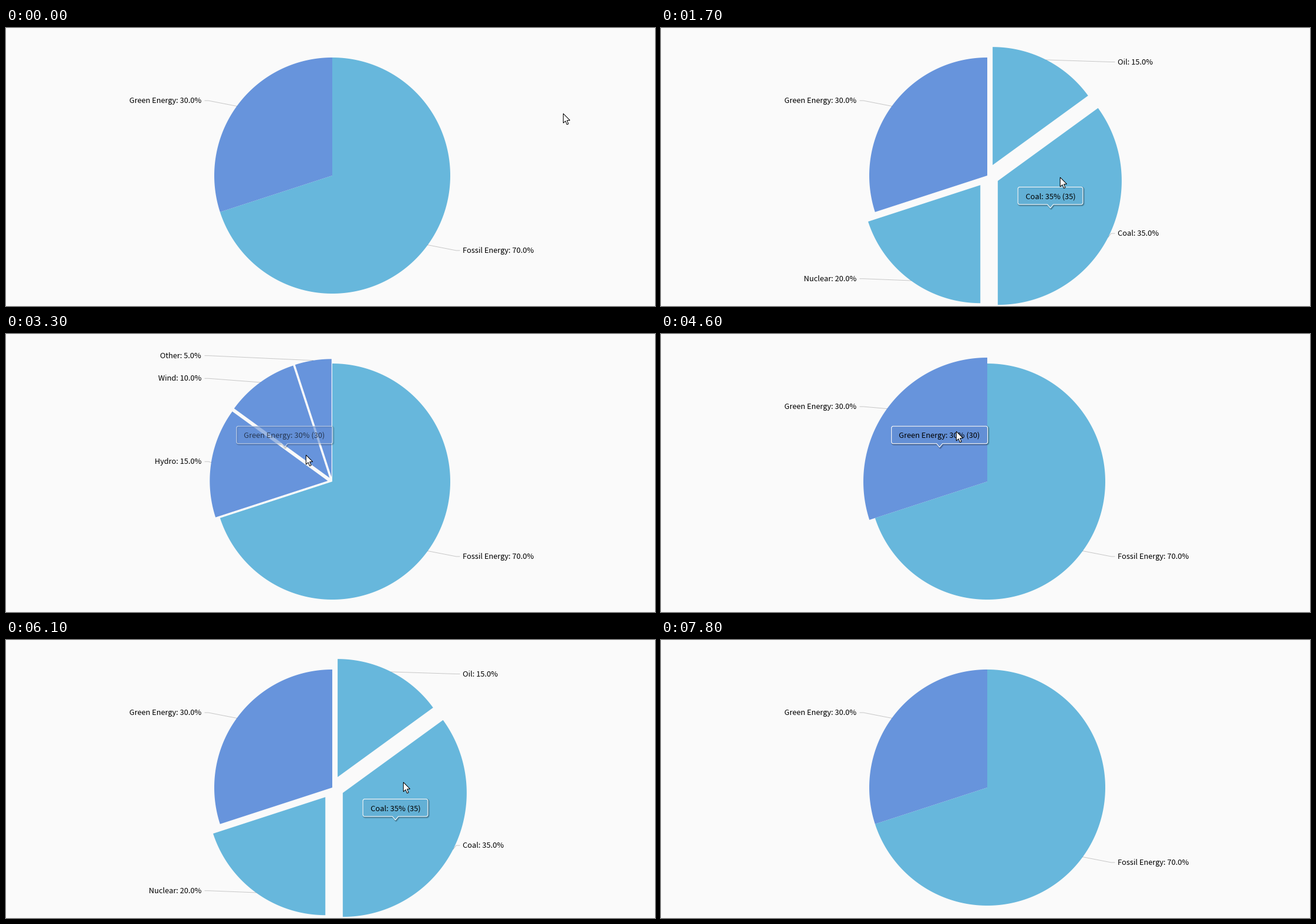
Write a matplotlib script that moves like this. It is 1100 by 471 pixels and loops after 8200 ms.

```python
import numpy as np
import matplotlib.pyplot as plt
from matplotlib.animation import FuncAnimation
from matplotlib.patches import Polygon

W, H, DPI = 1100, 471, 72          # at 72 dpi one point is one pixel
STEP, FRAMES = 100, 82
CENTER = np.array([553.0, 250.0])
RADIUS, GROW, PULL, LABEL_R = 200, 10, 20, 216
FADE = 400                         # ms for hover, pull and tooltip
TIP_DELAY = 80

BLUE, INDIGO = "#67b7dc", "#6794dc"
TIP_FILL = {BLUE: "#63b0d5", INDIGO: "#638fd5"}
FOSSIL, GREEN = "Fossil Energy", "Green Energy"
GROUPS = {
    FOSSIL: (BLUE, [("Oil", 15), ("Coal", 35), ("Nuclear", 20)]),
    GREEN: (INDIGO, [("Hydro", 15), ("Wind", 10), ("Other", 5)]),
}
TIP_WIDTH = {FOSSIL: 161, GREEN: 163, "Coal": 110, "Wind": 116}

# Which group is broken down, from which time on
PHASES = [(0, None), (970, FOSSIL), (2090, None), (3240, GREEN),
          (4120, None), (5390, FOSSIL), (6680, None)]
# slice, pointer in, pointer out, tooltip slides over from the previous slice
HOVERS = [
    (FOSSIL, 400, 970, False),
    ("Coal", 1290, 2090, False),
    (FOSSIL, 2090, 2750, False),
    (GREEN, 2750, 3240, True),
    ("Wind", 3450, 4120, False),
    (GREEN, 4120, 5080, False),
    (FOSSIL, 5080, 5390, True),
    ("Coal", 5690, 6680, False),
    (FOSSIL, 6680, 7270, False),
]
# start, end, destination of the pointer
POINTER_START = np.array([944.5, 145.0])
MOVES = [(30, 600, (676.5, 253)), (2450, 2900, (508.5, 205)),
         (3500, 3800, (500.5, 165)), (4950, 5300, (673.5, 241)),
         (7100, 7700, (1102, 190))]
ARROW = np.array([(0, 0), (0, 16), (3.7, 12.6), (6.3, 18.6), (8.8, 17.5),
                  (6.3, 11.6), (11.3, 11.4)])

plt.rcParams["font.family"] = ["Noto Sans CJK JP", "DejaVu Sans"]
FONT = 12.8


def build_slices():
    """Map each name to (value, start angle, end angle, colour, group)."""
    out, total = {}, 0
    for group, (color, parts) in GROUPS.items():
        first = total
        for name, value in parts:
            out[name] = (value, total * 3.6, (total + value) * 3.6, color, group)
            total += value
        out[group] = (total - first, first * 3.6, total * 3.6, color, None)
    return out


SLICES = build_slices()


def ease(ms):
    u = min(max(ms / FADE, 0), 1)
    return 1 - (1 - u) ** 3


def smooth(u):
    u = min(max(u, 0), 1)
    return u * u * (3 - 2 * u)


def direction(degrees):
    a = np.radians(degrees)
    return np.array([np.sin(a), -np.cos(a)])


def middle(name):
    return direction((SLICES[name][1] + SLICES[name][2]) / 2)


def phase(t):
    return [p for p in PHASES if p[0] <= t][-1]


def apex(name, t):
    start, opened = phase(t)
    group = SLICES[name][4]
    pull = PULL * ease(t - start) if group and group == opened else 0
    return CENTER + pull * middle(name)


def radius(name, t):
    since, opened = phase(t)
    r = RADIUS
    for hovered, start, end, _ in HOVERS:
        if hovered == name and start <= t and start >= since:
            r += GROW * (ease(t - start) - ease(t - end))
    return r


fig = plt.figure(figsize=(W / DPI, H / DPI), dpi=DPI, facecolor="#fafafa")
ax = fig.add_axes([0, 0, 1, 1])
ax.set_xlim(0, W)
ax.set_ylim(H, 0)
ax.axis("off")


def shape(points, **style):
    ax.add_patch(Polygon(points, closed=True, **style))


def draw_slice(name, t):
    _, a0, a1, color, _ = SLICES[name]
    tip, r = apex(name, t), radius(name, t)
    arc = [tip + r * direction(a) for a in np.linspace(a0, a1, 160)]
    shape([tip] + arc, facecolor=color, linewidth=0)


def draw_label(name, t):
    mid = middle(name)
    edge = apex(name, t) + radius(name, t) * mid
    y = CENTER[1] + LABEL_R * mid[1]
    if mid[0] > 0:
        knee, end, x, side = 763, 769, 774.5, "left"
    else:
        knee, end, x, side = 343, 337, 331, "right"
    ax.plot([edge[0], knee, end], [edge[1], y, y], color="black", alpha=0.2, lw=1)
    ax.text(x, round(y + 4), f"{name}: {SLICES[name][0]:.1f}%", ha=side,
            va="baseline", size=FONT, color="black")


def bubble(x, y, w, h=29.5, r=3):
    """Rounded box with a small pointer whose tip is at (x, y)."""
    left, right, bottom = x - w / 2, x + w / 2, y - 5.5
    top = bottom - h

    def corner(cx, cy, start):
        a = np.radians(np.linspace(start, start + 90, 6))
        return list(zip(cx + r * np.cos(a), cy + r * np.sin(a)))

    points = corner(left + r, top + r, 180) + corner(right - r, top + r, 270)
    points += corner(right - r, bottom - r, 0)
    points += [(x + 5, bottom), (x, y + 0.5), (x - 5, bottom)]
    return np.array(points + corner(left + r, bottom - r, 90))


def draw_tooltip(t):
    past = [i for i, hover in enumerate(HOVERS) if hover[1] <= t]
    if not past:
        return
    name, start, end, slides = HOVERS[past[-1]]
    spot = apex(name, t) + RADIUS / 2 * middle(name)
    shown = ease(t - start - TIP_DELAY)
    if slides:
        before = HOVERS[past[-1] - 1][0]
        origin = apex(before, t) + RADIUS / 2 * middle(before)
        spot = origin + (spot - origin) * ease(t - start)
        shown = 1
    alpha = shown - ease(t - end)
    if alpha <= 0.005:
        return
    value, color = SLICES[name][0], SLICES[name][3]
    outline = bubble(*spot, TIP_WIDTH[name])
    for width in (1, 2.5, 4):
        shape(outline + 1.2, fill=False, edgecolor="black", linewidth=width,
              alpha=0.13 * alpha, joinstyle="round")
    shape(outline, facecolor=TIP_FILL[color], edgecolor="white", linewidth=1.1,
          alpha=alpha)
    ax.text(spot[0], round(spot[1] - 14.9), f"{name}: {value}% ({value})",
            ha="center", va="baseline", size=FONT, color="black", alpha=alpha)


def draw_pointer(t):
    if t >= MOVES[-1][1]:
        return
    pos = POINTER_START
    for start, end, goal in MOVES:
        pos = pos + (np.array(goal) - pos) * smooth((t - start) / (end - start))
    shape(pos + ARROW, facecolor="white", edgecolor="black", linewidth=1,
          joinstyle="miter")


def draw(frame):
    t = frame * STEP
    for artist in [*ax.patches, *ax.lines, *ax.texts]:
        artist.remove()
    ax.plot([0, W], [470.5, 470.5], color="#dedede", lw=1)
    opened = phase(t)[1]
    visible = []
    for group, (_, parts) in GROUPS.items():
        visible += [name for name, _ in parts] if group == opened else [group]
    for name in visible:
        draw_slice(name, t)
    for name in visible:
        draw_label(name, t)
    draw_tooltip(t)
    draw_pointer(t)
    # later artists go on top, whatever their type
    for z, artist in enumerate(ax.get_children()):
        artist.set_zorder(z)
    return []


anim = FuncAnimation(fig, draw, frames=FRAMES, interval=STEP, repeat=True,
                     repeat_delay=0)
plt.show()
```
